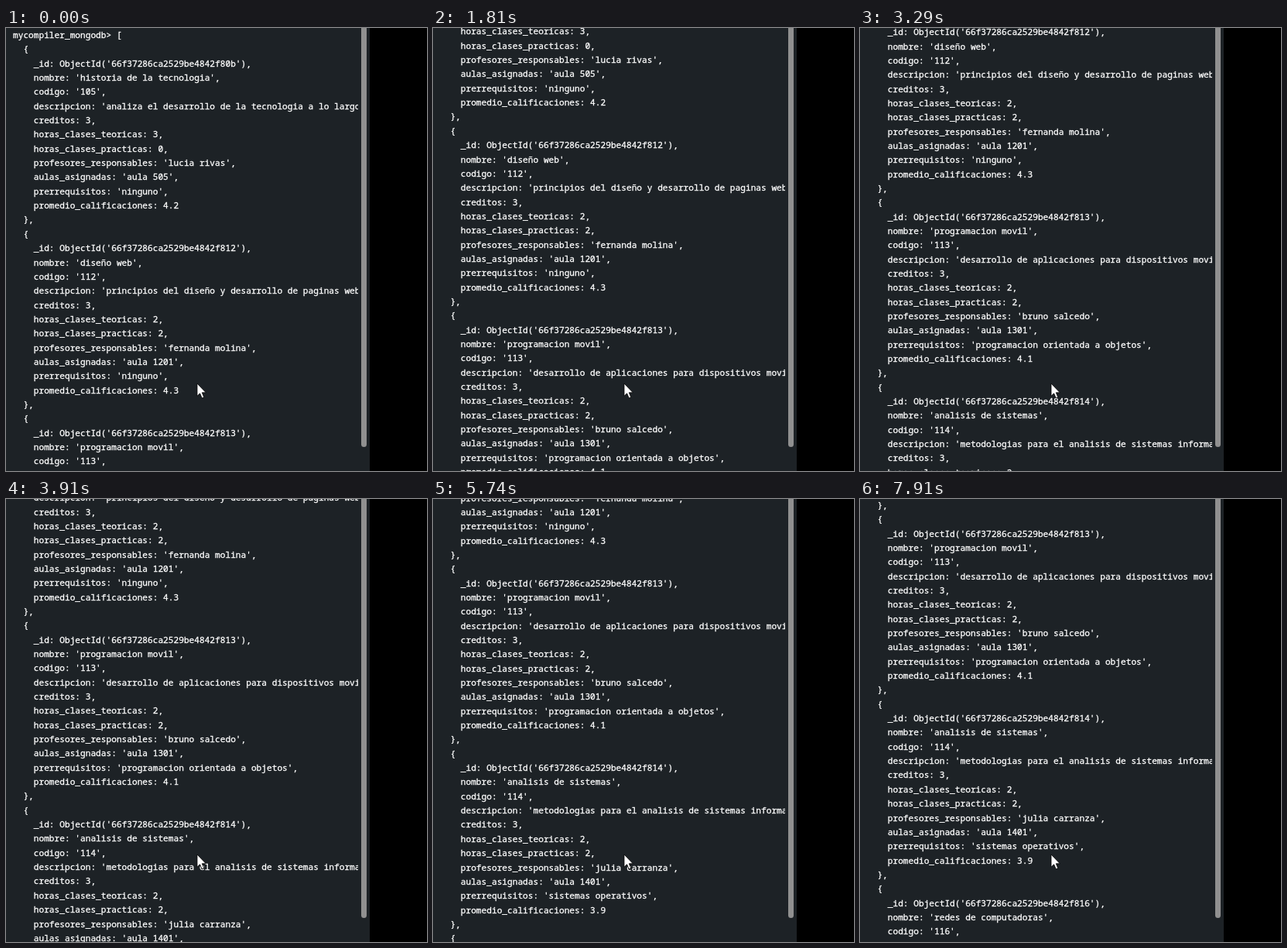
Write an HTML page that moves like this. It is 544x572 px and loops after 8000 ms.

```html
<!DOCTYPE html>
<html lang="es">
<head>
<meta charset="utf-8">
<title>Terminal</title>
<style>
  html, body { margin: 0; width: 100%; height: 100%; overflow: hidden; background: #000; }
  #panel { position: absolute; left: 0; top: 0; width: 470px; height: 572px; background: #1d2226; }
  #view { position: absolute; left: 0; top: 0; width: 455px; height: 572px; overflow: hidden; }
  #log {
    position: absolute; left: 9px; top: 0; margin: 0; white-space: pre; color: #fff;
    font: 500 11.17px/18.35px "Noto Sans Mono", "DejaVu Sans Mono", monospace;
    -webkit-text-stroke: .3px #fff;
  }
  #thumb { position: absolute; left: 459px; top: -10px; width: 7px; height: 551px; border-radius: 4px; background: #909090; }
  #cursor { position: absolute; left: 246px; top: 458px; }
</style>
</head>
<body>
<div id="panel">
  <div id="view"><pre id="log"></pre></div>
  <div id="thumb"></div>
  <svg id="cursor" width="14" height="22" viewBox="0 0 14 22">
    <path d="M1 1V17.2L4.6 13.8L7.2 19.8L9.8 18.7L7.3 12.8H12.3Z" fill="#fff" stroke="#000" stroke-width=".8"/>
  </svg>
</div>
<script>
  const LOOP = 8000;
  const TICK = 130;

  const record = ({ id, name, code, about, theory = 2, lab = 2, teacher, room, needs = 'ninguno', grade }) => `  {
    _id: ObjectId('66f37286ca2529be4842f${id}'),
    nombre: '${name}',
    codigo: '${code}',
    descripcion: '${about}',
    creditos: 3,
    horas_clases_teoricas: ${theory},
    horas_clases_practicas: ${lab},
    profesores_responsables: '${teacher}',
    aulas_asignadas: 'aula ${room}',
    prerrequisitos: '${needs}',
    promedio_calificaciones: ${grade}
  },`;

  const courses = [
    { id: '80b', name: 'historia de la tecnologia', code: 105, teacher: 'lucia rivas', room: 505, grade: 4.2,
      about: 'analiza el desarrollo de la tecnologia a lo largo de la historia', theory: 3, lab: 0 },
    { id: '812', name: 'diseño web', code: 112, teacher: 'fernanda molina', room: 1201, grade: 4.3,
      about: 'principios del diseño y desarrollo de paginas web' },
    { id: '813', name: 'programacion movil', code: 113, teacher: 'bruno salcedo', room: 1301, grade: 4.1,
      about: 'desarrollo de aplicaciones para dispositivos moviles', needs: 'programacion orientada a objetos' },
    { id: '814', name: 'analisis de sistemas', code: 114, teacher: 'julia carranza', room: 1401, grade: 3.9,
      about: 'metodologias para el analisis de sistemas informaticos', needs: 'sistemas operativos' },
    { id: '816', name: 'redes de computadoras', code: 116, about: 'fundamentos de las redes de computadoras' }
  ];

  // Scroll strokes: first and last jump in ms, offset reached in px.
  const strokes = [
    [310, 1310, 109], [1560, 2750, 228], [3000, 3290, 279],
    [3410, 4150, 366], [4430, 4550, 389], [4670, 4790, 399],
    [5070, 5740, 414], [6120, 6570, 422], [7370, 7910, 478]
  ];

  const frames = [];
  const hold = (time, y) => frames.push({
    offset: time / LOOP,
    transform: `translateY(${-Math.round(y)}px)`,
    easing: 'steps(1, end)'
  });

  // Each stroke is cut into equal jumps, one per tick.
  let y = 0;
  hold(0, y);
  for (const [start, end, goal] of strokes) {
    const gaps = Math.round((end - start) / TICK);
    for (let i = 0; i <= gaps; i++) {
      hold(start + (end - start) * i / gaps, y + (goal - y) * (i + 1) / (gaps + 1));
    }
    y = goal;
  }
  hold(LOOP, y);

  const log = document.getElementById('log');
  log.textContent = ['mycompiler_mongodb> [', ...courses.map(record)].join('\n');
  log.animate(frames, { duration: LOOP, iterations: Infinity });
</script>
</body>
</html>
```
